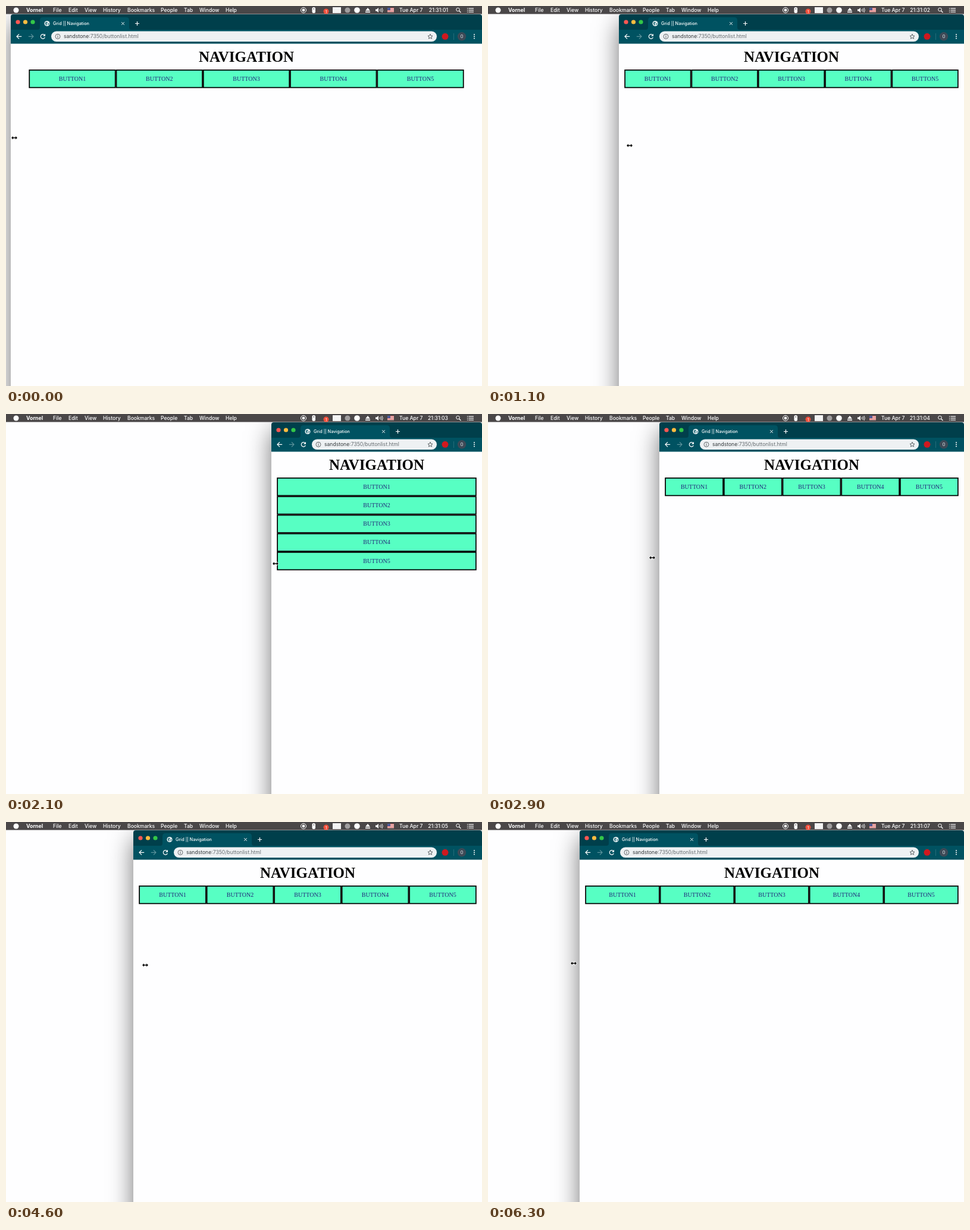
An HTML page with a canvas that plays this animation: 800x640 px, repeating every 6.4 s.

```html
<!DOCTYPE html>
<html lang="en">
<head>
<meta charset="utf-8">
<title>Responsive navigation</title>
<style>
  html, body { margin: 0; width: 100%; height: 100%; overflow: hidden; background: #fefeff; }
  canvas { display: block; }
</style>
</head>
<body>
<canvas width="800" height="640"></canvas>
<script>
const ctx = document.querySelector('canvas').getContext('2d');
const LOOP = 6400, STEP = 100, TAU = Math.PI * 2;
const SANS = 'Inter, sans-serif', SERIF = '"Liberation Serif", serif';
const STRIP = '#003f4b', TOOLBAR = '#005261', PALE = '#e4eef0';

// Time, left edge of the window, height of the pointer
const keys = [
  [0, 8, 222], [200, 20, 222], [700, 130, 228], [1100, 220, 235], [1500, 310, 241],
  [1900, 418, 249], [2150, 447, 252], [2400, 420, 251], [2900, 288, 242], [3300, 150, 237],
  [3700, 65, 234], [3900, 68, 234], [4500, 190, 240], [5000, 318, 248], [5300, 380, 252],
  [5500, 377, 252], [5800, 300, 247], [6300, 154, 238], [6500, 96, 236]
];

// Smooth cubic through the keys
function track(t, col) {
  const i = Math.max(0, keys.findIndex(k => k[0] > t) - 1);
  const slope = j => {
    const a = keys[Math.max(0, j - 1)], b = keys[Math.min(keys.length - 1, j + 1)];
    return j ? (b[col] - a[col]) / (b[0] - a[0]) : 0;
  };
  const a = keys[i], b = keys[i + 1], h = b[0] - a[0], s = (t - a[0]) / h, r = 1 - s;
  return a[col] * r * r * (1 + 2 * s) + b[col] * s * s * (3 - 2 * s)
    + h * s * r * (slope(i) * r - slope(i + 1) * s);
}

function text(str, x, y, size, color, { weight = 400, family = SANS, align = 'left' } = {}) {
  ctx.font = `${weight} ${size}px ${family}`;
  ctx.fillStyle = color;
  ctx.textAlign = align;
  ctx.fillText(str, x, y);
  return ctx.measureText(str).width;
}

function rect(x, y, w, h, color, radius = 0) {
  ctx.fillStyle = color;
  ctx.beginPath();
  ctx.roundRect(x, y, w, h, radius);
  ctx.fill();
}

function disc(x, y, r, color) {
  ctx.fillStyle = color;
  ctx.beginPath();
  ctx.arc(x, y, r, 0, TAU);
  ctx.fill();
}

function stroke(path, color, width = 1, x = 0, y = 0) {
  ctx.save();
  ctx.translate(x, y);
  ctx.strokeStyle = color;
  ctx.lineWidth = width;
  ctx.stroke(new Path2D(path));
  ctx.restore();
}

function fillPath(path, color, x = 0, y = 0) {
  ctx.save();
  ctx.translate(x, y);
  ctx.fillStyle = color;
  ctx.fill(new Path2D(path));
  ctx.restore();
}

function ring(x, y, r, color, width = 1) {
  ctx.strokeStyle = color;
  ctx.lineWidth = width;
  ctx.beginPath();
  ctx.arc(x, y, r, 0, TAU);
  ctx.stroke();
}

function menuBar(t) {
  rect(0, 0, 800, 13.5, '#4a4748');
  disc(17, 7, 4.5, '#fff');
  text('Vornel', 34, 10, 8.8, '#fff', { weight: 700 });
  const items = { File: 79, Edit: 105, View: 132, History: 163, Bookmarks: 204,
    People: 260, Tab: 299, Window: 325, Help: 369 };
  for (const name in items) text(name, items[name], 10, 8.6, '#fff', { weight: 500 });

  ring(500, 7, 4.5, '#fff');
  disc(500, 7, 2.4, '#fff');
  rect(514.5, 2, 5.5, 10, '#fff', 2.5);
  rect(516.8, 3.5, 1, 2.5, '#4a4748');
  disc(538, 9, 4.5, '#f0503c');
  text('1', 538, 11.5, 6.5, '#fff', { align: 'center' });
  rect(549, 2, 14, 10, '#f4f4f4');
  disc(574, 7, 4.5, '#a09e9f');
  disc(590, 7, 4.8, '#fff');
  fillPath('M0-4L4 1H-4ZM-4 2.2H4V4H-4Z', '#fff', 608, 7);
  fillPath('M-6-1.5H-4L-1-4V4L-4 1.5H-6Z', '#fff', 627, 7);
  stroke('M1-1.8Q2.2 0 1 1.8M3-3Q5 0 3 3M5-4Q7.6 0 5 4', '#fff', 0.9, 627, 7);

  rect(641, 3, 11, 7.5, '#f3e6e6');
  for (let i = 0; i < 4; i++) rect(641, 3 + i * 2, 11, 1, '#d8605f');
  rect(641, 3, 5, 4, '#4d5d9b');

  const second = 1 + Math.floor((t + 300) / 1000);
  const clock = { weight: 500 };
  text('Tue Apr 7', 661, 10, 8.6, '#fff', clock);
  text('21:31:0' + second, 743, 10, 8.6, '#fff', { ...clock, align: 'right' });
  ring(759.5, 6, 2.8, '#fff');
  stroke('M761.5 8L764.5 11', '#fff', 1.2);
  for (const y of [3.5, 6.5, 9.5]) {
    rect(775, y, 1.3, 1.2, '#fff');
    rect(777.5, y, 8.5, 1.2, '#fff');
  }
}

function tabStrip(x) {
  ['#fc5753', '#fdbc40', '#33c748'].forEach((c, i) => disc(x + 12 + i * 12.5, 27, 3.6, c));
  fillPath('M45 40Q49 40 49 36V24Q49 19 54 19H194Q199 19 199 24V36Q199 40 203 40Z', TOOLBAR, x);
  disc(x + 61, 29.5, 4.6, PALE);
  fillPath('M-3-2L0-3L1-1L-1 0L0 2L-1 3.5L-3 1ZM1.5 0L3.5-1L3 2L1.5 2.5Z', '#3f7f8a', x + 61, 29.5);
  text('Grid || Navigation', x + 71, 32, 7.3, '#fff', { weight: 500 });
  stroke('M-2.3-2.3L2.3 2.3M2.3-2.3L-2.3 2.3', '#fff', 1, x + 188.5, 29.5);
  stroke('M-3.5 0H3.5M0-3.5V3.5', '#fff', 1.2, x + 212.5, 29.5);
}

function toolbar(x) {
  rect(x, 40, 800 - x, 23.5, TOOLBAR);
  const arrow = 'M4.2 0H-4M0-4L-4 0L0 4';
  stroke(arrow, '#fff', 1.2, x + 14, 51.3);
  stroke('M-4.2 0H4M0-4L4 0L0 4', '#5d939c', 1.2, x + 34, 51.3);
  stroke('M3.4 1.5A3.7 3.7 0 1 1 2.5-2.7', '#fff', 1.2, x + 54, 51.3);
  fillPath('M4-4.5V-.5H0Z', '#fff', x + 54, 51.3);

  rect(x + 68, 42.5, 656 - x, 17.5, '#eef1f3', 8.75);
  ring(x + 79, 51.3, 4, '#55595c', 0.9);
  rect(x + 78.5, 50.6, 1, 3, '#55595c');
  rect(x + 78.5, 48.8, 1, 1, '#55595c');
  const host = text('sandstone', x + 89, 54.4, 8.6, '#33383b');
  text(':7350/buttonlist.html', x + 89 + host, 54.4, 8.6, '#666c70');

  stroke('M0-4L1.2-1.3L4-1L1.9 .9L2.5 3.7L0 2.2L-2.5 3.7L-1.9 .9L-4-1L-1.2-1.3Z', '#4d5356', 0.9, 713, 51.3);
  disc(738, 51.3, 5.5, '#d0191f');
  rect(752, 46, 0.8, 11, '#2f7480');
  disc(766, 51.3, 7.2, '#3d4a57');
  text('0', 766, 54.2, 8, '#dfe5e8', { align: 'center' });
  for (const y of [48, 51.3, 54.6]) disc(787, y, 1, '#fff');
}

function page(x) {
  const width = 800 - x, mid = (x + 800) / 2;
  const centered = { family: SERIF, align: 'center' };
  text('NAVIGATION', mid, 93.5, 25, '#000', { ...centered, weight: 700 });

  const navWidth = Math.min(width - 18.5, 731.25), left = mid - navWidth / 2;
  const stacked = width < 480, cell = stacked ? navWidth : navWidth / 5, row = 31.25, line = 1.75;
  for (let i = 0; i < 5; i++) {
    const bx = left + (stacked ? 0 : i * cell), by = 106.9 + (stacked ? i * row : 0);
    rect(bx, by, cell, row, '#000');
    rect(bx + line, by + line, cell - 2 * line, row - 2 * line, '#57ffc3');
    text('BUTTON' + (i + 1), bx + cell / 2, by + 18.8, 10, '#22237a', centered);
  }
}

function browserWindow(x) {
  ctx.save();
  ctx.shadowColor = 'rgba(0,0,0,.55)';
  ctx.shadowBlur = 40;
  ctx.shadowOffsetY = 14;
  rect(x, 14, 800 - x, 660, '#fefeff', 4);
  ctx.restore();
  rect(x, 14, 800 - x, 30, STRIP, [4, 4, 0, 0]);
  tabStrip(x);
  toolbar(x);
  page(x);
}

function pointer(x, y) {
  const shape = 'M-5 0L-2-2.8V-.8H2V-2.8L5 0L2 2.8V.8H-2V2.8Z';
  stroke(shape, '#fff', 1.2, x, y);
  fillPath(shape, '#000', x, y);
}

function draw(now) {
  const t = Math.floor(now % LOOP / STEP) * STEP;
  ctx.fillStyle = '#fefeff';
  ctx.fillRect(0, 0, 800, 640);
  browserWindow(Math.round(track(t, 1)));
  menuBar(t);
  // The window trails the pointer slightly
  pointer(Math.round(track(t + (t && 55), 1) + 6), Math.round(track(t, 2)));
}

const start = performance.now();
function frame() {
  draw(performance.now() - start);
  requestAnimationFrame(frame);
}
frame();
</script>
</body>
</html>
```
